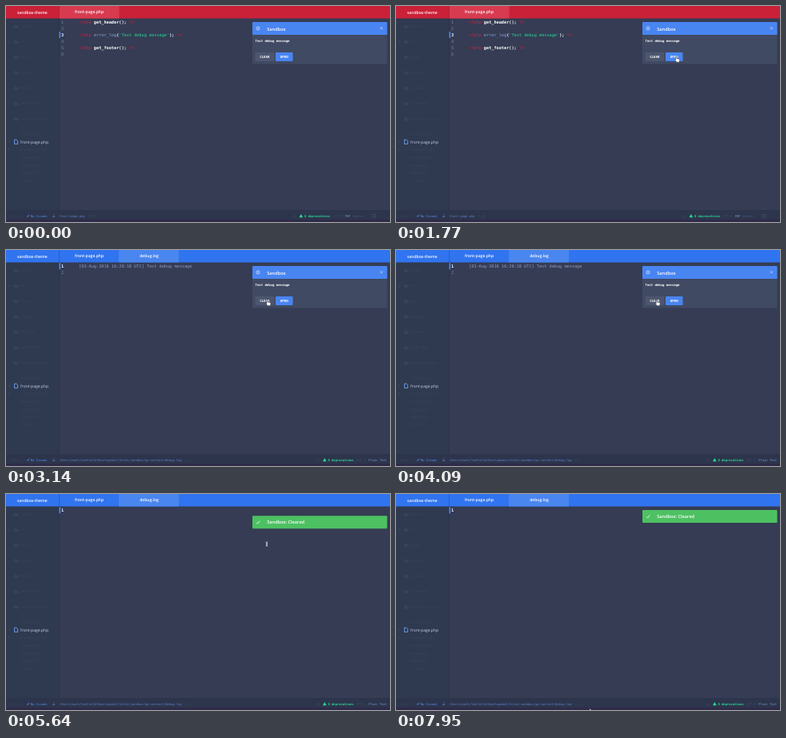
These frames come from a looping animation (480 by 270 pixels, 7990 ms). An HTML page:

```html
<!DOCTYPE html>
<html lang="en">
<head>
<meta charset="utf-8">
<title>Debug log notification</title>
<style>
  html, body { margin: 0; width: 100%; height: 100%; overflow: hidden; background: #353c54; }
  svg { display: block; width: 100vw; height: 100vh; }
  text { white-space: pre; text-rendering: geometricPrecision; font: 600 5px "Open Sans", sans-serif; fill: #fff; }
  .mono text, text.mono { font: 5.22px "DejaVu Sans Mono", monospace; }
  .status text { font-size: 3.8px; }
  text.title { font-size: 5.6px; }
  text.button { font: bold 4.1px "DejaVu Sans Mono", monospace; }
  text.mid { text-anchor: middle; }
  .faint text { font-weight: 400; fill: #39455f; }
  .line { fill: none; stroke-width: .8; }
  .red { fill: #d51f43; } .white { fill: #fff; font-weight: bold; }
  .blue { fill: #8ba5d8; } .green { fill: #2bd796; }
</style>
</head>
<body>
<svg viewBox="0 0 480 270" preserveAspectRatio="none">
  <rect width="480" height="270" fill="#353c54"/>
  <rect y="15" width="66" height="240" fill="#2f394f"/>
  <rect x="66" y="15" width="1" height="240" fill="#2b344a"/>
  <rect y="255" width="480" height="12" fill="#2d354c"/>
  <rect y="267" width="480" height="3" fill="#302b49"/>

  <rect id="bar" width="480" height="15.5"/>
  <rect id="tab" width="75" height="15.5"/>
  <path d="M66.5 0V15.5" stroke="#1b2340" stroke-opacity=".35" stroke-width=".7"/>
  <text class="mid" x="32.8" y="9.5">sandbox-theme</text>
  <text class="mid" x="104" y="9.2">front-page.php</text>

  <g id="tree" class="faint"></g>
  <path d="M10.5 167.2h2.6l1.6 1.6v3.7h-4.2z" fill="none" stroke="#6fa2f2" stroke-width=".9"/>
  <text x="18" y="171.6" style="font-weight:400;fill:#c8d5ee">front-page.php</text>

  <g id="php" class="mono"></g>
  <g id="log" class="mono">
    <text class="mid" style="font:600 5px 'Open Sans',sans-serif" x="179" y="9.2">debug.log</text>
    <text id="entry" x="91" y="22.1" style="fill:#929dbd">[03-Aug-2016 16:20:18 UTC] Test debug message</text>
  </g>
  <g id="numbers" class="mono"></g>
  <rect id="marker" x="66.5" width="1.5" height="8" fill="#4f8cf5"/>
  <path id="caret" d="M91 16.5v8M171.5 16.5v8" stroke="#689cf2" stroke-width=".7"/>

  <g id="status" class="mono status">
    <text x="6" y="263.5" style="fill:#414c68">File 1</text>
    <path class="line" d="M26 262.2l1.2 1.4 2.1-2.9" stroke="#5c92f5"/>
    <text x="31" y="263.5" style="fill:#5c92f5">No Issues</text>
    <path class="line" d="M58.2 263.5h3M60.8 260.5l-1.8 2" stroke="#5c7ed0"/>
    <text id="path" x="66.5" y="263.5" style="fill:#617fc7"/>
    <text id="position" y="263.5" style="fill:#414c68"/>
    <g id="right">
      <text x="-8" y="263.5" style="fill:#414c68">LF</text>
      <path d="M0 264.2l2.3-4.2 2.3 4.2z" fill="#2bd796"/>
      <text x="6.5" y="263.5" style="fill:#2bd796;font-weight:bold">0 deprecations</text>
      <text x="42" y="263.5" style="fill:#414c68">UTF-8</text>
      <text id="grammar" x="57.2" y="263.5" style="fill:#7894d0"/>
      <g id="branch">
        <text x="67" y="263.5" style="fill:#48587b">master</text>
        <rect x="91.5" y="260.5" width="3.5" height="3.5" fill="none" stroke="#48587b" stroke-width=".6"/>
        <text x="97" y="263.5" style="fill:#414c68">0</text>
      </g>
    </g>
  </g>

  <g id="info">
    <rect x="308" y="20" width="168.5" height="52.5" rx="1" fill="#414a63"/>
    <path d="M308 36V21q0-1 1-1h166.5q1 0 1 1v15z" fill="#4985f1"/>
    <circle cx="315" cy="28" r="2.1" fill="none" stroke="#dce8ff" stroke-width=".7"/>
    <path class="line" d="M315 27.6v1.6M315 26.5v.5" stroke="#dce8ff"/>
    <text class="title" x="326.3" y="30.5">Sandbox</text>
    <path class="line" d="M468 26.3l2.8 2.8m0-2.8l-2.8 2.8" stroke="#c5d9ff"/>
    <g id="closeAll">
      <rect x="433" y="23.2" width="28.5" height="9.3" rx=".8" fill="none" stroke="#8fb3f7" stroke-width=".6"/>
      <text class="mono mid" x="447.2" y="29.2" style="font-size:3.8px;fill:#b3ccfb">CLOSE ALL</text>
    </g>
    <text class="mono" x="311.5" y="44.7" style="font-size:3.97px;font-weight:bold">Test debug message</text>
    <rect x="311.5" y="58" width="23.8" height="11" rx=".8" fill="#4c566f"/>
    <rect x="337" y="58" width="21.5" height="11" rx=".8" fill="#4985f1"/>
    <text class="button mid" x="323.3" y="65">CLEAR</text>
    <text class="button mid" x="347.7" y="65">OPEN</text>
  </g>

  <g id="success">
    <rect width="168.5" height="16" rx="1" fill="#4dc162"/>
    <path class="line" d="M5 8.2l1.5 1.6 2.7-3.5" stroke="#fff"/>
    <text class="title" x="18.3" y="10">Sandbox: Cleared</text>
  </g>

  <g id="pointer">
    <path id="hand" d="M-.7 .4q.7-1 1.3 0v2.4l3 .7q.7.2.6 1l-.6 3h-3.4l-2-3q.3-.9 1.1-.1z" fill="#fff" stroke="#1c2233" stroke-width=".5"/>
    <path id="beam" class="line" d="M-1.2-2.2q1.2 0 1.2.8v3.6q0 .8-1.2.8M1.2-2.2q-1.2 0-1.2.8v3.6q0 .8 1.2.8" stroke="#dfe5f2"/>
    <path id="arrow" d="M0 0v6l1.5-1.3 1 2.2 1-.5-1-2.1h2z" fill="#fff" stroke="#1c2233" stroke-width=".4"/>
  </g>
</svg>
<script>
const LOOP = 7990, OPENED = 2030, CLEARED = 5150, HIDE = 5355, SHRINK = 5455;
const $ = id => document.getElementById(id);
const show = (id, on) => $(id).style.display = on ? "" : "none";
const set = (id, attrs) => { for (const k in attrs) $(id).setAttribute(k, attrs[k]); };
const phase = (t, start, length) => Math.min(1, Math.max(0, (t - start) / length));
const smooth = p => p * p * (3 - 2 * p);
const lineY = n => 22.1 + (n - 1) * 7.9;

// Editor lines as [class, text] runs
const open = ["red", "<?php "], close = ["red", " ?>"];
const code = {
  1: [open, ["white", "get_header();"], close],
  3: [open, ["blue", "error_log"], ["white", "("], ["green", "'Test debug message'"], ["white", ");"], close],
  5: [open, ["white", "get_footer();"], close]
};
$("php").innerHTML = Object.entries(code).map(([n, runs]) =>
  `<text x="91" y="${lineY(n)}">` + runs.map(([cls, s]) =>
    `<tspan class="${cls}">${s.replace("<", "&lt;")}</tspan>`).join("") + "</text>").join("");

$("numbers").innerHTML = [1, 2, 3, 4, 5, 6].map(n =>
  `<text x="69" y="${lineY(n)}">${n}</text>`).join("");

const folders = ["assets", "css", "fonts", "images", "includes", "languages", "template-parts"];
const files = ["footer.php", "", "functions.php", "header.php", "index.php", "page.php", "style.css"];
$("tree").innerHTML = folders.map((s, i) => {
  const y = 25.5 + i * 19.25;
  return `<path d="M10 ${y - 2}h2l.6.7h2.8v3.7h-5.4z" fill="#37435d"/><text x="18" y="${y + 1.6}">${s}</text>`;
}).join("") + files.map((s, i) => s && `<text x="18" y="${162 + i * 9.65}">${s}</text>`).join("") +
  `<path d="M3.5 44l1.3 1.2-1.3 1.2M3.5 168.3l1.3 1.2-1.3 1.2M3.5 178.3l1.3 1.2-1.3 1.2" class="line" stroke="#465573"/>`;

// Pointer stops: [time, x, y]
const stops = [
  [0, 242, 272], [700, 242, 272], [1550, 350.5, 62.7], [2650, 350.5, 62.7],
  [3200, 326, 62.2], [6500, 326, 62.2], [7300, 242, 268], [LOOP, 242, 268]
];
function pointerAt(t) {
  const i = stops.findIndex(s => s[0] > t), [t0, x0, y0] = stops[i - 1], [t1, x1, y1] = stops[i];
  const p = smooth(phase(t, t0, t1 - t0));
  return [x0 + (x1 - x0) * p, y0 + (y1 - y0) * p];
}

function drawEditor(t) {
  const log = t >= OPENED, cleared = t >= CLEARED;
  set("bar", { fill: log ? "#3174ef" : "#cb2138" });
  set("tab", { x: log ? 141 : 66.5, fill: log ? "#4a86ef" : "#d83b50" });
  show("php", !log);
  show("log", log);
  show("entry", !cleared);
  show("caret", log && t < OPENED + 800);
  const active = log ? 1 : 3, count = cleared ? 1 : log ? 2 : 6;
  [...$("numbers").children].forEach((el, i) => {
    el.style.display = i < count ? "" : "none";
    el.style.fill = i + 1 === active ? "#fff" : "#7884a3";
    el.style.fontWeight = i + 1 === active ? "bold" : "normal";
  });
  set("marker", { y: log ? 16.3 : 32.1 });
  $("path").textContent = log
    ? "/Users/mark/tomfield/Development/Sites/sandbox/wp-content/debug.log" : "front-page.php";
  $("position").textContent = log ? (cleared ? "1:1" : "2:1") : "3:39";
  set("position", { x: log ? 223.5 : 102 });
  $("grammar").textContent = log ? "Plain Text" : "PHP";
  show("branch", !log);
  set("right", { transform: `translate(${log ? 396 : 366.5})` });
}

function drawNotices(t) {
  const hide = phase(t, HIDE, 110), rise = smooth(phase(t, SHRINK, 240)), appear = smooth(phase(t, CLEARED, 160));
  show("info", hide < 1);
  show("closeAll", t >= CLEARED);
  set("info", {
    opacity: 1 - hide * hide,
    transform: `translate(392.2 46.2) scale(${1 - .1 * hide}) translate(-392.2 -46.2)`
  });
  show("success", appear > 0);
  set("success", {
    opacity: appear,
    transform: `translate(308 ${77 - 57 * rise - 6 * (1 - appear)}) scale(1 ${appear})`
  });
}

function drawPointer(t) {
  const [x, y] = pointerAt(t);
  const onButton = t < SHRINK + 110 && y > 58 && y < 69 && (x > 337 && x < 358 || x > 311 && x < 335);
  const onEditor = !onButton && y < 255 && (t > SHRINK + 110 || y > 72);
  set("pointer", { transform: `translate(${x} ${y})` });
  show("hand", onButton);
  show("beam", onEditor);
  show("arrow", !onButton && !onEditor);
}

function frame() {
  const t = performance.now() % LOOP;
  drawEditor(t);
  drawNotices(t);
  drawPointer(t);
  requestAnimationFrame(frame);
}
frame();
</script>
</body>
</html>
```
